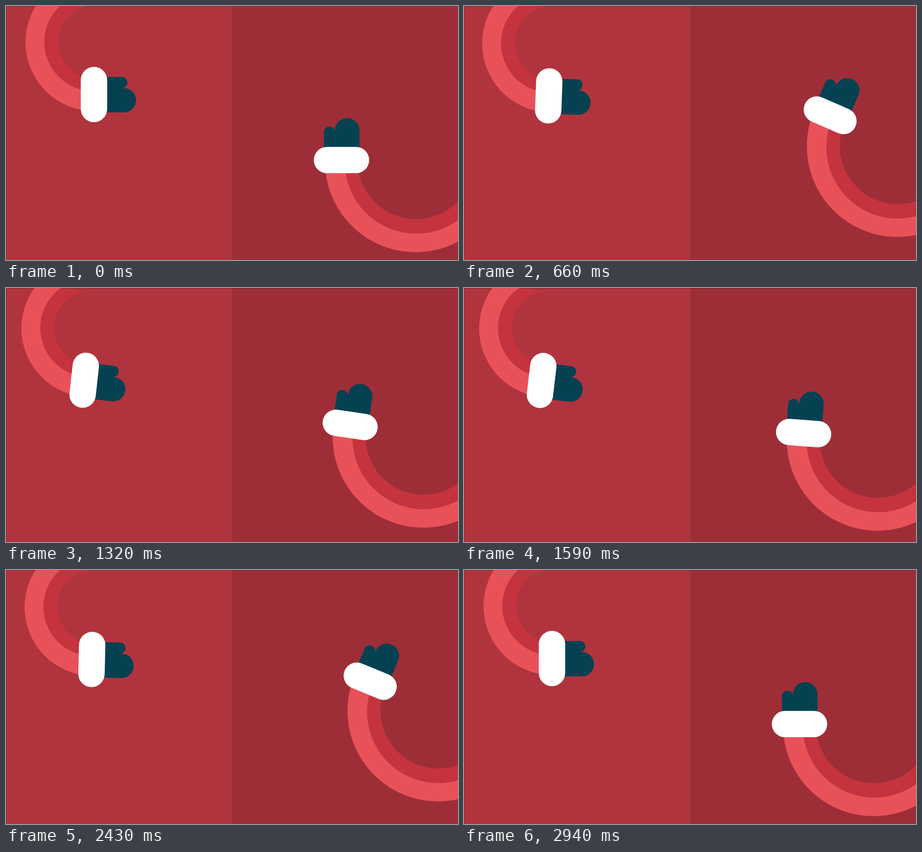
Recreate the animation shown at these times as an HTML page. Size 998 px wide and 561 px high, loop 3030 ms.

```html
<!DOCTYPE html>
<html lang="en">
<head>
<meta charset="utf-8">
<title>Waving mittens</title>
<style>
  html, body { margin: 0; width: 100%; height: 100%; overflow: hidden; background: #b0343e; }
  svg { display: block; width: 100%; height: 100%; }
  .light { fill: #e95159; }
  .shade { fill: #c5333e; }
</style>
</head>
<body>
<svg viewBox="0 0 998 561" preserveAspectRatio="none">
  <defs>
    <g id="mitten">
      <path fill="#064152" d="M-38.8 0V-60A12.2 12.2 0 0 1 -14.4 -63V-65.8A27 27 0 0 1 39.6 -65.8V0Z"/>
      <rect x="-61.1" y="-29.1" width="122.2" height="58.2" rx="29.1" fill="#fff"/>
    </g>
    <clipPath id="shoulder"><rect x="0" y="-1.7" width="300" height="300"/></clipPath>
  </defs>
  <rect width="998" height="561" fill="#b0343e"/>
  <rect x="499.5" width="498.5" height="561" fill="#9d2e38"/>
  <path d="M0.5 561V0.5H998" fill="none" stroke="#000" stroke-opacity=".25"/>
  <g id="left">
    <g id="leftArm" clip-path="url(#shoulder)"></g>
    <use href="#mitten" transform="translate(194.25 195.5) rotate(90)"/>
  </g>
  <g id="right">
    <g id="rightArm"></g>
    <use href="#mitten" transform="translate(740.75 340.25)"/>
  </g>
</svg>
<script>
const byId = id => document.getElementById(id);
const LOOP = 3030, STEP = 30, LAST = 2940;
const WAVE_START = 25, WAVE_HALF = 729, WAVE_ANGLE = 23.8;
const SWING_PEAK = 1482, SWING_HALF = 1218;

// Half ring between two circles [cx, cy, r], starting at angle `from` and turning by `turn`.
function halfRing(outer, inner, from, turn) {
  const at = ([cx, cy, r], a) => `${cx + r * Math.cos(a)} ${cy + r * Math.sin(a)}`;
  const sweep = turn > 0 ? 1 : 0, to = from + turn;
  return `M${at(outer, from)}A${outer[2]} ${outer[2]} 0 0 ${sweep} ${at(outer, to)}` +
    `L${at(inner, to)}A${inner[2]} ${inner[2]} 0 0 ${1 - sweep} ${at(inner, from)}Z`;
}

function drawArm(id, outer, middle, inner, from, turn) {
  byId(id).innerHTML =
    `<path class="shade" d="${halfRing(middle, inner, from, turn)}"/>` +
    `<path class="light" d="${halfRing(outer, middle, from, turn)}"/>`;
}

drawArm('leftArm', [195, 80, 152], [193, 79.5, 108.5], [196.5, 79, 81.3], Math.PI / 2, Math.PI);
drawArm('rightArm', [904.5, 343.5, 200.2], [905.7, 345.5, 157.3], [905, 342.8, 128.2], Math.PI, -Math.PI);

// cubic-bezier(.25, .1, .25, 1)
function ease(x) {
  let lo = 0, hi = 1, s = 0.5;
  for (let i = 0; i < 24; i++) {
    s = (lo + hi) / 2;
    if (0.75 * s * (1 - s) + s ** 3 < x) lo = s; else hi = s;
  }
  return 0.3 * s * (1 - s) ** 2 + 3 * s * s * (1 - s) + s ** 3;
}

function waveAngle(t) {
  if (t <= WAVE_START || t >= LAST) return 0;
  const phase = ((t - WAVE_START) / WAVE_HALF) % 2;
  return WAVE_ANGLE * ease(phase < 1 ? phase : 2 - phase);
}

function swingAngle(t) {
  const u = Math.max(0, 1 - Math.abs(t - SWING_PEAK) / SWING_HALF);
  return 6 * u + 1.4 * u * u;
}

function render(ms) {
  const t = Math.min(LAST, Math.floor((ms % LOOP) / STEP) * STEP);
  byId('left').setAttribute('transform', `rotate(${swingAngle(t)} 108.5 2.2)`);
  byId('right').setAttribute('transform', `rotate(${waveAngle(t)} 1011.5 453)`);
}

const start = performance.now();
function tick() {
  render(performance.now() - start);
  requestAnimationFrame(tick);
}
tick();
</script>
</body>
</html>
```
